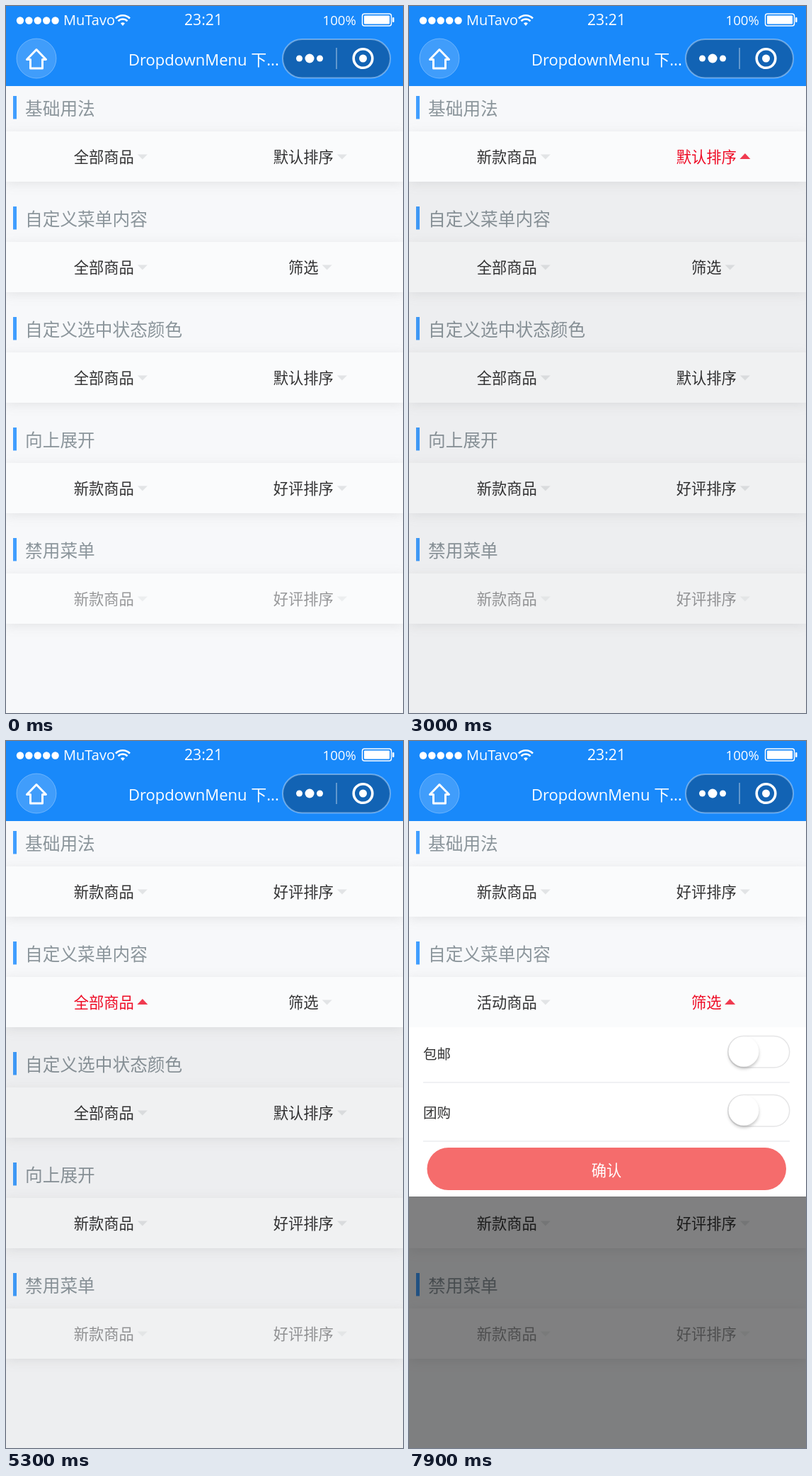
Recreate the animation shown at these times as an HTML page. Size 561x998 px, loop 8 s.

```html
<!DOCTYPE html>
<html lang="zh-CN">
<head>
<meta charset="utf-8">
<title>DropdownMenu</title>
<style>
  html, body { margin: 0; width: 100%; height: 100%; overflow: hidden; background: #f7f8fa; }
  svg { display: block; width: 100vw; height: 100vh; }
  text { font-family: "Open Sans", "Noto Sans CJK SC", "Noto Sans CJK", sans-serif; white-space: pre; }
  .label { font-family: "Noto Sans CJK SC", "Noto Sans CJK", sans-serif; font-weight: 350; }
  .bar { filter: drop-shadow(0 3px 8px rgba(100, 101, 102, .13)); }
  .knob { filter: drop-shadow(0 3px 2px rgba(0, 0, 0, .22)); }
</style>
</head>
<body>
<svg viewBox="0 0 561 998" xmlns="http://www.w3.org/2000/svg">
  <defs><clipPath id="below"><rect width="561" height="998"/></clipPath></defs>
  <rect width="561" height="998" fill="#f7f8fa"/>
  <g id="page"></g>
  <g id="popup"></g>
  <g id="header" fill="#fff">
    <rect width="561" height="113" fill="#1989fa"/>
    <g id="signal"></g>
    <text x="81" y="27" font-size="20">MuTavo</text>
    <g fill="none" stroke="#fff" stroke-width="2.6">
      <path d="M155 17.5a14 14 0 0 1 20 0M158.5 21.3a9 9 0 0 1 13 0"/>
      <path d="M162 24.6a4.5 4.5 0 0 1 6 0L165 28z" fill="#fff" stroke="none"/>
    </g>
    <text x="279" y="26.5" font-size="21.2" text-anchor="middle">23:21</text>
    <text x="447.5" y="27" font-size="18.6">100%</text>
    <rect x="503.5" y="11" width="41" height="17" rx="3" fill="none" stroke="#fff" stroke-width="1.5"/>
    <rect x="506" y="13.5" width="36" height="12" rx="1"/>
    <rect x="546" y="16" width="2.5" height="7" rx="1"/>
    <circle cx="43" cy="74" r="28" fill-opacity=".17" stroke="#fff" stroke-opacity=".3"/>
    <path d="M29.5 75.5 43 61.5l13.5 14H51.5V88H34.5V75.5Z" fill="none" stroke="#fff" stroke-width="3" stroke-linejoin="round"/>
    <text x="173" y="84" font-size="22">DropdownMenu 下...</text>
    <rect x="391" y="47" width="152" height="54.5" rx="27.25" fill="#1263b4" stroke="#fff" stroke-opacity=".36" stroke-width="2"/>
    <circle cx="414.5" cy="74" r="4.5"/>
    <circle cx="429" cy="74" r="6.5"/>
    <circle cx="443.5" cy="74" r="4.5"/>
    <path d="M467 59v30" stroke="#fff" stroke-opacity=".45" stroke-width="1.5"/>
    <circle cx="504.5" cy="74" r="13.3" fill="none" stroke="#fff" stroke-width="3.6"/>
    <circle cx="504.5" cy="74" r="5.5"/>
  </g>
</svg>
<script>
const LOOP = 8000, STEP = 100, PITCH = 156, BAR_TOP = 177, BAR_H = 71, ROW_H = 63.4;
const RED = '#ee0a24', INK = '#323233', GREY = '#969799';
const GOODS = ['全部商品', '新款商品', '活动商品'];
const SORTS = ['默认排序', '好评排序', '销量排序'];

const sections = [
  { title: '基础用法', cells: ['全部商品', '默认排序'] },
  { title: '自定义菜单内容', cells: ['全部商品', '筛选'] },
  { title: '自定义选中状态颜色', cells: ['全部商品', '默认排序'] },
  { title: '向上展开', cells: ['新款商品', '好评排序'] },
  { title: '禁用菜单', cells: ['新款商品', '好评排序'], disabled: true }
];

const menus = [
  { section: 0, cell: 0, open: 1000, close: 2000, items: GOODS, pick: 1 },
  { section: 0, cell: 1, open: 3000, close: 4300, items: SORTS, pick: 1 },
  { section: 1, cell: 0, open: 5300, close: 6900, items: GOODS, pick: 2 },
  { section: 1, cell: 1, open: 7800, close: LOOP }
];

// Share of the shade and of the panel that is visible, per step.
const OPENING = [{ shade: .08, panel: 0 }, { shade: .98, panel: .98 }, { shade: 1, panel: 1 }];
const CLOSING = [{ shade: .6, panel: .785 }, { shade: .06, panel: .2 }, { shade: 0, panel: 0 }];

const byId = id => document.getElementById(id);

function label(text, x, middle, size, fill, anchor = 'start') {
  return `<text class="label" x="${x}" y="${middle + size * .37}" font-size="${size}" fill="${fill}" text-anchor="${anchor}">${text}</text>`;
}

const divider = y => `<rect x="20" y="${y - .8}" width="518" height="1.5" fill="#ebedf0"/>`;

function cellView(text, cell, middle, active, disabled) {
  const size = 21.3, x = cell ? 420.3 : 138.3;
  const tip = x + text.length * size / 2 + 12;
  const arrow = active
    ? `<path d="M${tip - 7.5} ${middle + 3}h15l-7.5-8z" fill="${RED}" opacity=".8"/>`
    : `<path d="M${tip - 7} ${middle - 3.5}h14l-7 7z" fill="#dcdee0" opacity="${disabled ? .45 : .8}"/>`;
  return label(text, x, middle, size, active ? RED : disabled ? GREY : INK, 'middle') + arrow;
}

function cellText(s, c, t) {
  const done = menus.find(m => m.section === s && m.cell === c && t >= m.close);
  return done ? done.items[done.pick] : sections[s].cells[c];
}

function pageView(t) {
  return sections.map(({ title, cells, disabled }, s) => {
    const top = BAR_TOP + s * PITCH;
    const views = cells.map((_, c) => {
      const active = menus.some(m => m.section === s && m.cell === c && t >= m.open && t < m.close);
      return cellView(cellText(s, c, t), c, top + 36, active, disabled);
    });
    return `<rect x="10" y="${top - 50}" width="5" height="32.5" fill="#409eff"/>`
      + label(title, 27, top - 32, 24.7, '#8b959b')
      + `<rect class="bar" y="${top}" width="561" height="${BAR_H}" fill="#fafbfc"/>`
      + views.join('');
  }).join('');
}

function listView(items, selected) {
  return items.map((text, i) => {
    const middle = 32 + i * ROW_H, on = i === selected;
    return label(text, 20, middle, 19.5, on ? RED : INK)
      + (on ? `<path d="M511 ${middle + 1}l5 5.5 12-9" fill="none" stroke="${RED}" stroke-width="1.8"/>` : '')
      + (i ? divider(i * ROW_H) : '');
  }).join('');
}

function filterView() {
  const rows = ['包邮', '团购'].map((text, i) => {
    const y = i * 83;
    return label(text, 20, y + 43, 19.5, INK)
      + `<rect x="450.7" y="${y + 17.5}" width="87" height="44.5" rx="22.25" fill="#fff" stroke="#e5e5e6" stroke-width="1.5"/>`
      + `<circle class="knob" cx="473" cy="${y + 39.5}" r="21.3" fill="#fff"/>`
      + divider(y + 83);
  });
  return rows.join('')
    + '<rect x="25.5" y="175" width="507.5" height="60" rx="30" fill="#f56c6c"/>'
    + label('确认', 279, 207.5, 21.3, '#fff', 'middle');
}

function popupView(t) {
  const menu = menus.find(m => t >= m.open && t < m.close + 2 * STEP);
  if (!menu) return '';
  const closing = t >= menu.close;
  const phases = closing ? CLOSING : OPENING;
  const step = Math.floor((t - (closing ? menu.close : menu.open)) / STEP);
  const { shade, panel } = phases[Math.min(step, 2)];
  const height = menu.items ? Math.round(3 * ROW_H) : 244;
  const content = menu.items ? listView(menu.items, closing ? menu.pick : 0) : filterView();
  return `<g transform="translate(0 ${BAR_TOP + BAR_H + menu.section * PITCH})" clip-path="url(#below)">
    <rect width="561" height="998" opacity="${shade / 2}"/>
    <g transform="translate(0 ${Math.round((panel - 1) * height)})"><rect width="561" height="${height}" fill="#fff"/>${content}</g>
  </g>`;
}

let shown = -1;
function render(time) {
  const t = Math.floor(time % LOOP / STEP) * STEP;
  if (t === shown) return;
  shown = t;
  byId('page').innerHTML = pageView(t);
  byId('popup').innerHTML = popupView(t);
}

byId('signal').innerHTML = [0, 1, 2, 3, 4].map(i => `<circle cx="${20 + i * 12.4}" cy="20.5" r="5.2"/>`).join('');

const start = performance.now();
function tick() {
  render(performance.now() - start);
  requestAnimationFrame(tick);
}
tick();
</script>
</body>
</html>
```
